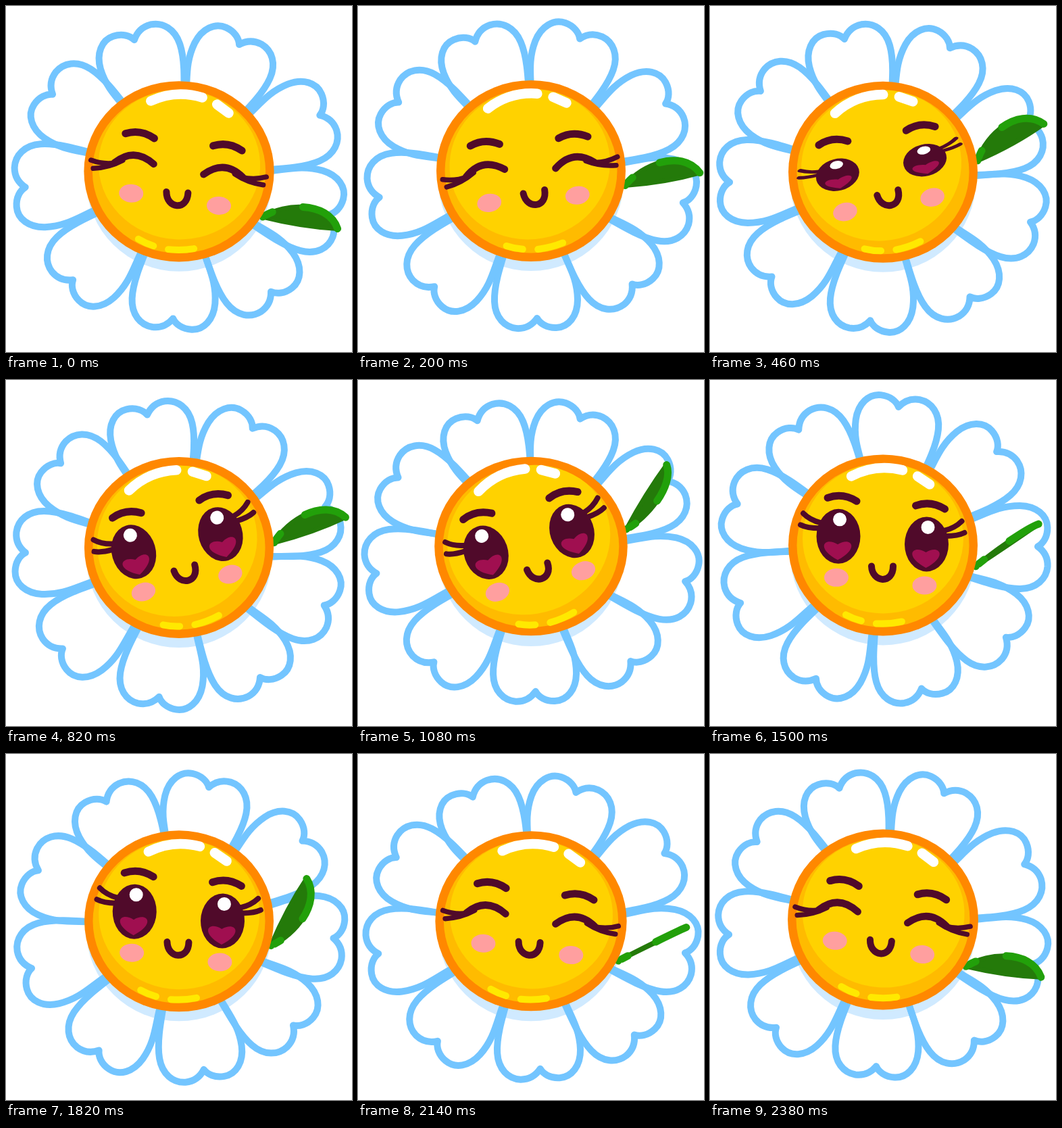
An HTML page with a canvas for the animation above (2400 ms loop, 512 by 512 pixels).

```html
<!DOCTYPE html>
<html lang="en">
<head>
<meta charset="utf-8">
<title>Swaying daisy</title>
<style>
html, body { margin: 0; height: 100%; overflow: hidden; background: #fff; }
canvas { display: block; width: 100vw; height: 100vh; }
</style>
</head>
<body>
<canvas id="stage" width="512" height="512"></canvas>
<script>
const ctx = document.getElementById('stage').getContext('2d');
const LOOP = 2400, HALF = LOOP / 2, RAD = Math.PI / 180;
const INK = '#500a2a';

const PETAL = new Path2D('M-34-90C-44-130-62-150-61-188C-60-212-46-228-28-228' +
  'C-14-228-4-221 0-213C6-221 16-228 30-227C48-225 62-210 62-186C62-160 50-130 36-90');
const HEART = new Path2D('M0 14C-34-4-19-21 0-9C19-21 34-4 0 14Z');

// Smooth periodic curve through [time, value] keys.
function curve(keys, t) {
  const n = keys.length;
  const key = i => {
    const [time, value] = keys[(i + n) % n];
    return [time + LOOP * Math.floor(i / n), value];
  };
  const slope = i => {
    const [t0, v0] = key(i - 1), [t1, v1] = key(i + 1);
    return (v1 - v0) / (t1 - t0);
  };
  let i = n - 1;
  while (i > 0 && keys[i][0] > t) i--;
  const [t0, v0] = key(i), [t1, v1] = key(i + 1);
  const d = t1 - t0, u = (t - t0) / d, w = 1 - u;
  return v0 * w * w * (1 + 2 * u) + v1 * u * u * (3 - 2 * u) +
    d * u * w * (slope(i) * w - slope(i + 1) * u);
}

// The head swings to one side, then mirrors the move to the other.
const swing = [[0, 10.5], [300, -7.5], [460, -7], [620, -8.5], [820, -9], [1080, -11.5], [1150, -12]];
const tiltKeys = [...swing, ...swing.map(([t, v]) => [t + HALF, -v])];
const slipKeys = [[0, 0], [460, 12.3], [820, 11], [1080, 0], [1500, 1], [1820, 0]];
const stemKeys = [[0, 0], [460, -18.5], [820, -12.5], [1080, -17.5], [1500, -13], [1820, -12]];
const leafKeys = [[0, 9], [460, -29], [820, -19.5], [1080, -58], [1500, -34], [1820, -62], [2380, 8]];
const bendKeys = [[0, 22], [460, 24], [820, 22], [1080, -15], [1500, 3], [1820, -21], [2380, 22]];

function at(x, y, degrees, draw) {
  ctx.save();
  ctx.translate(x, y);
  ctx.rotate(degrees * RAD);
  draw();
  ctx.restore();
}

function oval(x, y, rx, ry, color) {
  ctx.beginPath();
  ctx.ellipse(x, y, rx, ry, 0, 0, 7);
  ctx.fillStyle = color;
  ctx.fill();
}

function line(path, width, color) {
  ctx.lineWidth = width;
  ctx.strokeStyle = color;
  ctx.stroke(new Path2D(path));
}

function drawPetals(cy, turn, squash) {
  for (let i = 0; i < 9; i++) {
    const base = 40 * i + 22.5 + turn;
    const angle = base + 1.5 + 2.5 * Math.sin((2 * base - 37) * RAD);
    const side = Math.sin(angle * RAD) ** 2;
    at(257, cy, angle, () => {
      ctx.translate(0, (1 + 2 * squash) * (1 - side) - (15 + 1.5 * squash) * side);
      ctx.lineWidth = 10;
      ctx.strokeStyle = '#73c5ff';
      ctx.stroke(PETAL);
    });
  }
}

function drawLeaf(cy, stem, direction, bend, squash) {
  const x = 256 + (141 + squash) * Math.cos(stem * RAD), y = cy + 139 * Math.sin(stem * RAD);
  at(x, y, direction, () => {
    const edge = `M0 0C30 ${-1.2 * bend} 92 ${-1.7 * bend} 112 0`;
    const blade = edge + `Q60 ${bend * 0.25} 0 0Z`;
    ctx.fillStyle = '#247a0a';
    ctx.fill(new Path2D(blade));
    line(blade, 7, '#247a0a');
    ctx.setLineDash([0, 6, 10, 46, 200]);
    line(edge, 11, '#22a00a');
  });
}

function drawEye(side, open) {
  const lid = 1 - open;
  at(0, 18 * lid, 0, () => line('M-16-57Q6-65 27-52', 11, INK));
  oval(-3, 61 - 12 * lid, 18, 13.5, '#ff9f9f');
  if (open < 0.2) {
    ctx.scale(side, 1);
    line('M-28 4Q2-20 30 5', 10.5, INK);
    line('M28 5Q46 9 65 3M18 1Q38 13 61 15', 7.5, INK);
    return;
  }
  ctx.scale(1, open);
  ctx.save();
  ctx.scale(side, 1);
  line('M52-34Q42-24 26-20M56-17Q46-12 28-12', 8, INK);
  ctx.restore();
  oval(0, 0, 32.5, 40.5, INK);
  ctx.clip();
  ctx.translate(-1, 21);
  ctx.fillStyle = '#a00f50';
  ctx.fill(HEART);
  oval(3, -46, 10, 10, '#fff');
}

function drawFace(cy, tilt, open, squash) {
  const rx = 140 + squash, ry = 134 - squash * 0.6;
  oval(256, cy, rx, ry, '#ff8800');
  oval(256, cy, rx - 12.5, ry - 12.5, '#ffbb00');
  at(256, cy, tilt, () => {
    oval(0, -10, rx - 21, ry - 23, '#ffd200');
    line('M-47-102Q-11-121 29-111M51-102L69-90', 14.5, '#fff');
    line('M-55 103Q-44 109-32 112M-10 116Q10 117 28 113', 10, '#ffe900');
    line('M-17 31C-16 56 15 58 15 31', 10, INK);
    at(-66, -13, 0, () => drawEye(-1, open));
    at(64.5, -1.5, 0, () => drawEye(1, open));
  });
}

function draw(t) {
  const beat = t % HALF / HALF * 2 * Math.PI;
  const bob = Math.cos(beat - 0.3 * Math.PI);
  const squash = 3 * Math.max(0, Math.cos(beat - 1.74 * Math.PI)) ** 4;
  const tilt = curve(tiltKeys, t) - 7.5;
  const turn = tilt - 3 + t / 60 + curve(slipKeys, t);
  const open = Math.max(0, Math.min(1, (t - 400) / 105, (2075 - t) / 105));
  const cy = 246 - 2 * bob;

  ctx.fillStyle = '#fff';
  ctx.fillRect(0, 0, 512, 512);
  ctx.lineCap = ctx.lineJoin = 'round';
  oval(256, cy + 14, 137, 134, '#d0eaff');
  drawPetals(254.5 - 4.4 * bob, turn, squash);
  drawLeaf(cy, 26 + tilt + curve(stemKeys, t), curve(leafKeys, t), curve(bendKeys, t), squash);
  drawFace(cy, tilt, open, squash);
}

function frame() {
  draw(performance.now() % LOOP);
  requestAnimationFrame(frame);
}
frame();
</script>
</body>
</html>
```
